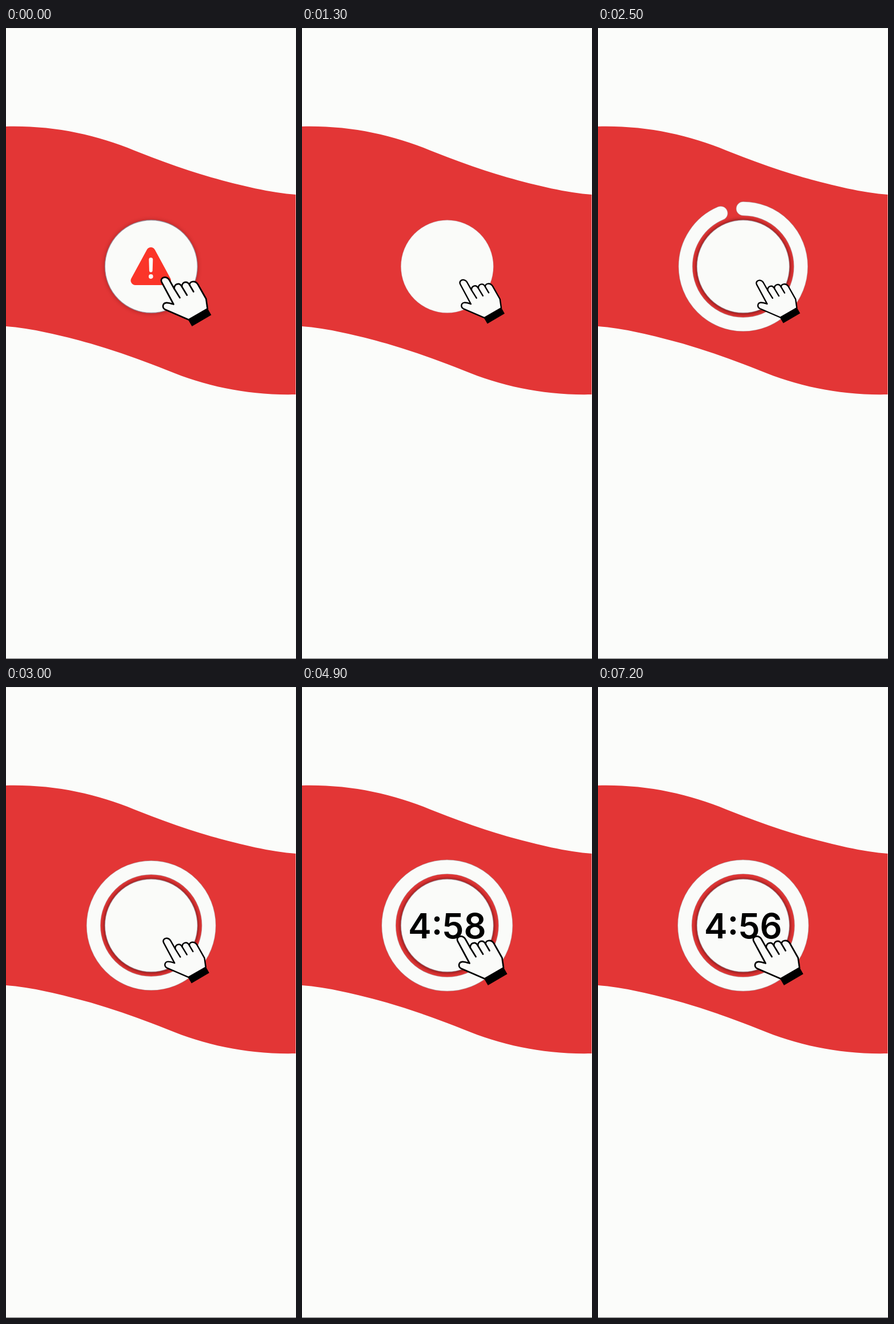
Write an HTML page that moves like this. It is 508 by 1102 pixels and loops after 7400 ms.

```html
<!DOCTYPE html>
<html lang="en">
<head>
<meta charset="utf-8">
<title>Press and countdown</title>
<style>
  html, body { margin: 0; width: 100%; height: 100%; overflow: hidden; background: #fbfcfa; }
  svg { display: block; width: 100%; height: 100%; }
  text { font: 600 61px Inter, Roboto, sans-serif; text-anchor: middle; }
  .arc { fill: none; stroke-linecap: round; }
</style>
</head>
<body>
<svg viewBox="0 0 508 1102">
  <defs>
    <filter id="blur" x="-20%" y="-20%" width="140%" height="140%">
      <feGaussianBlur stdDeviation="3.2"/>
    </filter>
  </defs>
  <rect width="508" height="1102" fill="#fbfcfa"/>
  <path fill="#e33636" d="M0 172C82 170 157 186 225 214C270 232 315 248 360 261C410 275 465 288 508 291
    V640C426 642 351 626 283 598C238 580 193 564 148 551C98 537 43 524 0 521Z"/>
  <path d="M0 .5H508" stroke="#eeefed"/>
  <path d="M507.5 0V1102" stroke="#f3eff1" opacity=".6"/>
  <path d="M0 1101.5H508" stroke="#6b6b6b"/>

  <circle id="shadow" cx="254.3" cy="417" r="83" fill="#400" filter="url(#blur)"/>
  <g id="ring">
    <path class="arc" stroke="#b58a8c" stroke-width="25" pathLength="100"/>
    <path class="arc" stroke="#fafbf9" stroke-width="23.6" pathLength="100"/>
  </g>
  <circle cx="254.3" cy="416.5" r="81" fill="#fafbf9"/>
  <circle id="rim" cx="254.3" cy="416.5" r="81" fill="none" stroke="#8f8796" stroke-width="1.3"/>

  <g id="warning">
    <path d="M253.8 391L226.5 441H281Z" fill="#fb3529" stroke="#fb3529" stroke-width="16" stroke-linejoin="round"/>
    <path d="M250.3 404.5a3.5 3.5 0 0 1 7 0L256.7 423.5a2.9 2.9 0 0 1-5.8 0Z" fill="#fafbf9"/>
    <circle cx="253.8" cy="434" r="3.9" fill="#fafbf9"/>
  </g>
  <text id="clock" x="254.3" y="439"></text>

  <g id="hand" stroke="#000" stroke-width="2.7" stroke-linecap="round" stroke-linejoin="round">
    <path fill="#fafbf9" d="M320 509.5L279 491.8C273 488.5 274 480.5 281 479.8C285 479.6 289 481 293.5 482.5
      L273 444.5C270 439 274 435 279 435.4C282 435.8 284.5 437.5 286 440L294.8 455.5
      C294 447.5 303.5 443 308.2 452C307.5 444 317 440 321.7 449C321 442.5 331 440 336 447.5
      L350.5 473L353 490.5Z"/>
    <path fill="none" d="M294.8 455.5L304.5 471M308.2 452L317 466.5M321.7 449L328.5 460.5"/>
    <path stroke="none" d="M319 509.5L353 489.5L359.6 501.2L325.8 521Z"/>
  </g>
</svg>
<script>
const LOOP = 7400, STEP = 100;
const $ = id => document.getElementById(id);
const arcs = document.querySelectorAll('.arc');

// Full circle, clockwise from the top
for (const arc of arcs) arc.setAttribute('d', 'M0-101a101 101 0 0 1 0 202a101 101 0 0 1 0-202');

const ease = (t, from, to) => {
  const p = Math.min(1, Math.max(0, (t - from) / (to - from)));
  return p * p * (3 - 2 * p);
};

function draw(t) {
  const press = ease(t, 940, 1420) - ease(t, 2840, 3240);
  const scale = 1 - 0.125 * press;
  $('hand').setAttribute('transform', `translate(315.5 477.7) scale(${scale}) translate(-315.5 -477.7)`);

  $('warning').setAttribute('opacity', 1 - ease(t, 940, 1250));
  const idle = 1 - ease(t, 940, 1300), active = ease(t, 1700, 2100);
  $('shadow').setAttribute('opacity', 0.25 * idle + 0.6 * active);
  $('rim').setAttribute('opacity', 0.2 + 0.6 * idle + 0.3 * active);

  const fill = ease(t, 1950, 2600);
  const pulse = 0.02 * (ease(t, 2550, 2750) - ease(t, 2750, 3000));
  const grow = 1 + pulse + 0.013 * ease(t, 3000, 3300);
  $('ring').setAttribute('transform', `translate(254.3 416.5) scale(${grow})`);
  $('ring').setAttribute('visibility', fill ? 'visible' : 'hidden');
  for (const arc of arcs) arc.setAttribute('stroke-dasharray', `${fill * 100} 200`);

  const left = 300 - Math.max(0, Math.floor((t - 3700) / 1000) + 1);
  $('clock').textContent = `${Math.floor(left / 60)}:${String(left % 60).padStart(2, '0')}`;
  $('clock').setAttribute('opacity', ease(t, 3050, 3350));
}

const start = performance.now();
function tick() {
  const t = Math.max(0, performance.now() - start) % LOOP;
  draw(Math.floor(t / STEP) * STEP);
  requestAnimationFrame(tick);
}
tick();
</script>
</body>
</html>
```
